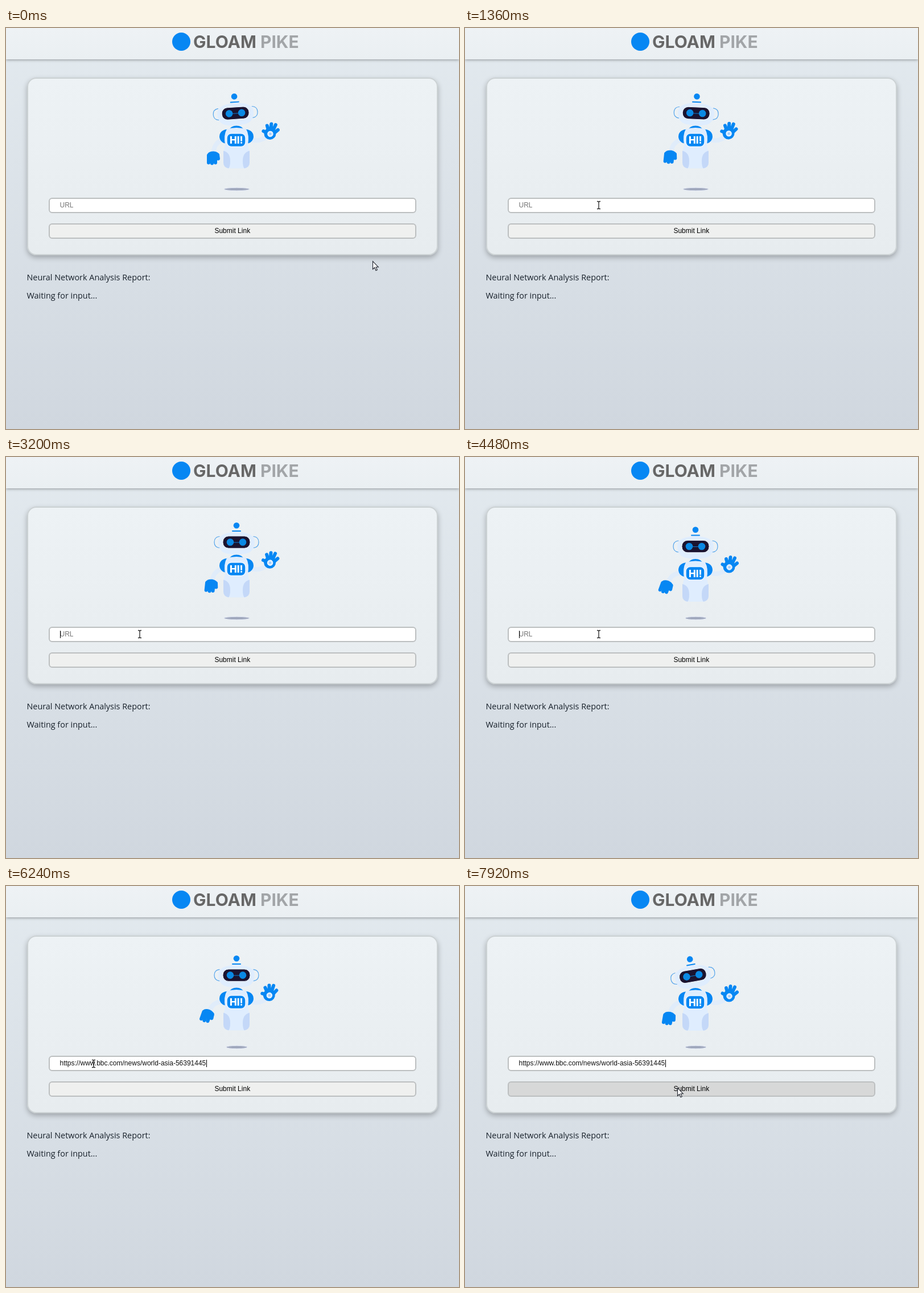
Animation of 796x704 px, one loop 8000 ms. Source, as an HTML page:

```html
<!DOCTYPE html>
<html lang="en">
<head>
<meta charset="utf-8">
<title>Link analysis</title>
<style>
  html, body { margin: 0; width: 100%; height: 100%; overflow: hidden; }
  body { position: relative; background: linear-gradient(#e3eaef, #d0d7df); }
  div, svg { position: absolute; box-sizing: border-box; }
  header {
    position: absolute; left: 0; top: 0; width: 100%; height: 55px;
    background: linear-gradient(#eef2f5, #eaeff2);
    box-shadow: 0 1px 5px rgba(0, 0, 0, .38);
  }
  .card {
    left: 37px; top: 87px; width: 722px; height: 312px;
    border: 2px solid #cbd1d3; border-radius: 16px;
    background: linear-gradient(#edf2f5, #e7ecef);
    box-shadow: 0 4px 10px rgba(0, 0, 0, .27);
  }
  .field {
    left: 75px; width: 646px; height: 27px;
    border: 2px solid #bcbfc0; border-radius: 6px;
  }
  #input { top: 298px; background: #fff; }
  #button { top: 343px; background: #eff0ef; }
  #button.hover { background: #d7d8d8; }
  svg { left: 0; top: 0; }
  .ui { font: 12px "Liberation Sans", Arial, sans-serif; }
  .report { font: 14.4px "Open Sans", sans-serif; fill: #18212b; }
  .brand { font: 700 30px Inter, sans-serif; }
  .blue { fill: #0787f3; }
  .pale { fill: #dfedfe; }
  .side { fill: #c4d8f8; }
  .line { fill: none; stroke-linecap: round; stroke-linejoin: round; }
  .arm { stroke: #e0ecfa; stroke-width: 8; }
  .finger { stroke: #0787f3; stroke-width: 6; }
  .ear { stroke: #55a5ec; stroke-width: 1.2; }
</style>
</head>
<body>
<header></header>
<div class="card"></div>
<div class="field" id="input"></div>
<div class="field" id="button"></div>

<svg width="796" height="704" viewBox="0 0 796 704">
  <circle class="blue" cx="308" cy="24" r="16"/>
  <text class="brand" x="329" y="35" fill="#676767">GLOAM <tspan fill="#a2a5a8">PIKE</tspan></text>

  <ellipse id="shadow" cx="405.500" cy="283" ry="2.700" fill="#a0a8bd" stroke="#e2e8f5" stroke-width="1"/>

  <g id="robot">
    <g id="leftArm">
      <path class="line arm" d="M379 195Q365 202 365 217"/>
      <path class="blue" d="M354 220Q356 215 365 215Q374 216 375 222L371 231H354Z"/>
      <path class="line finger" stroke-width="5" d="M356 222V235M362 224V236M368 224V235M372 221L373 228"/>
    </g>
    <path class="line arm" d="M430 194Q441 199 454 192"/>
    <g id="rightHand">
      <path class="line finger" d="M464 185L452.500 179.500M462 181L459 170M465 180L466.500 167M468 181L474 168.500M470 184L478 177.500"/>
      <circle class="blue" cx="464" cy="184" r="10.500"/>
      <circle cx="464.500" cy="184.500" r="4.700" fill="#d9eaff" stroke="#fff" stroke-width="1"/>
      <circle cx="464.500" cy="184.500" r="2" fill="#9ccbfa"/>
    </g>

    <path class="blue" d="M391 176Q375 177 375 190Q376 198 384 201L395 196ZM419 176Q435 177 435 190Q434 198 426 201L415 196Z"/>
    <path class="blue" d="M392 178Q395 170 405 170Q415 170 418 178Z"/>
    <path class="pale" d="M388 176Q405 171 422 176Q428 186 425 204L428 218V236Q426 245 417 245H393Q384 245 382 236V218L385 204Q382 186 388 176Z"/>
    <path class="side" d="M382 214Q394 217 394 232Q394 242 391 245Q382 243 382 235ZM428 214Q416 217 416 232Q416 242 419 245Q428 243 428 235Z"/>
    <rect class="blue" x="388" y="183.500" width="33" height="23.500" rx="8" stroke="#eef6ff" stroke-width="1.500"/>
    <text x="404.800" y="201.500" text-anchor="middle" fill="#fff" font-family="Inter, sans-serif" font-weight="800" font-size="17">HI!</text>

    <g id="head">
      <circle class="blue" cx="405" cy="118.700" r="5.300"/>
      <path class="line" stroke="#0787f3" stroke-width="2" d="M398 128.500H412"/>
      <path class="line ear" d="M375 138Q366 139 366 148Q366 157 375 158M435 138Q444 139 444 148Q444 157 435 158"/>
      <path class="pale" d="M394 131Q405 129 416 131Q437 134 437 148Q436 165 422 168Q405 171 388 168Q374 165 373 148Q373 134 394 131Z"/>
      <rect x="381" y="137.300" width="48" height="21.500" rx="10" fill="#1b1430" stroke="#f0f6ff" stroke-width="1"/>
      <path class="line" stroke="#0b79ce" stroke-width="1" d="M394 148.500H416"/>
      <circle cx="394" cy="148" r="6.300" fill="#0a89e4"/>
      <circle cx="416" cy="148" r="6.300" fill="#0a89e4"/>
    </g>
  </g>

  <text id="url" class="ui" x="94.500" y="315"></text>
  <path id="caret" stroke="#000" d="M0 305V318"/>
  <text class="ui" x="397.800" y="360" text-anchor="middle">Submit Link</text>
  <text class="report" x="36.500" y="443">Neural Network Analysis Report:</text>
  <text class="report" x="36.500" y="475">Waiting for input...</text>

  <path id="arrow" fill="#fff" stroke="#20242e" stroke-width="1.100" d="M.5.500V14.500L3.700 11.500L6 16.800L8.300 15.800L6.100 10.700H10.300Z"/>
  <path id="beam" class="line" stroke="#222" stroke-width="1.300" d="M-2.500-6.500H-1L0-5.500L1-6.500H2.500M0-5.500V5.500M-2.500 6.500H-1L0 5.500L1 6.500H2.500"/>
</svg>

<script>
const $ = id => document.getElementById(id);
const set = (id, name, value) => $(id).setAttribute(name, value);
const show = (id, on) => $(id).style.display = on ? '' : 'none';

const LOOP = 8000, STEP = 80, HOVER_CYCLE = 1720;
const CLICK = 1920, PASTE = 4720, BLINK = 530;
const LINK = 'https://www.bbc.com/news/world-asia-56391445';

// Keys are [time, value, ...]; values ease between neighbours.
const bobKeys = [[0, 9], [280, 1.5], [700, 1.5], [940, 0], [1440, 1.5], [1720, 9]];
const swingKeys = [[0, 20], [320, 6], [440, 6], [680, 0], [960, 1], [1400, 5], [1720, 20]];
const headKeys = [[0, -4], [240, 0], [1040, -10], [1360, 2.5], [1900, 0], [7120, 0], [7920, -10]];
const cursorKeys = [
  [160, 644, 409], [400, 603, 370], [560, 520, 340], [760, 395, 320], [960, 235, 311],
  [5280, 235, 311], [5440, 272, 329], [5600, 235, 320], [5960, 131, 312], [6160, 146, 312],
  [6700, 200, 312], [6960, 330, 320], [7120, 373, 344], [7300, 373, 354]
];

function track(keys, t, column = 1, ease = k => k * k * (3 - 2 * k)) {
  const next = keys.findIndex(key => key[0] > t);
  if (next < 0) return keys[keys.length - 1][column];
  if (next === 0) return keys[0][column];
  const a = keys[next - 1], b = keys[next];
  return a[column] + (b[column] - a[column]) * ease((t - a[0]) / (b[0] - a[0]));
}

function drawRobot(t) {
  const u = (t - 4480 + 3 * HOVER_CYCLE) % HOVER_CYCLE;
  const bob = track(bobKeys, u);
  const swing = track(swingKeys, u) * (t > 7400 ? .5 : 1);
  const wave = -20 * Math.max(0, Math.cos((t - 5440) / 700 * 2 * Math.PI)) ** 2;
  set('robot', 'transform', `translate(0 ${bob})`);
  set('shadow', 'rx', 23 - bob * .5);
  set('head', 'transform', `rotate(${track(headKeys, t)} 405 175)`);
  set('leftArm', 'transform', `rotate(${swing} 380 192)`);
  set('rightHand', 'transform', `rotate(${wave} 456 196)`);
}

function drawForm(t) {
  const pasted = t >= PASTE;
  $('url').textContent = pasted ? LINK : 'URL';
  set('url', 'fill', pasted ? '#111' : '#757575');
  const since = t - (pasted ? PASTE : CLICK);
  show('caret', since >= 0 && since % (2 * BLINK) < BLINK);
  set('caret', 'transform', `translate(${pasted ? 352.5 : 95.5})`);
}

function drawCursor(t) {
  const linear = k => k;
  const x = track(cursorKeys, t, 1, linear), y = track(cursorKeys, t, 2, linear);
  const overInput = y > 298 && y < 325;
  for (const id of ['arrow', 'beam']) set(id, 'transform', `translate(${x} ${y})`);
  show('beam', overInput);
  show('arrow', !overInput);
  $('button').classList.toggle('hover', y > 346 && y < 370);
}

function frame() {
  const t = Math.floor(performance.now() % LOOP / STEP) * STEP;
  drawRobot(t);
  drawForm(t);
  drawCursor(t);
  requestAnimationFrame(frame);
}
frame();
</script>
</body>
</html>
```
